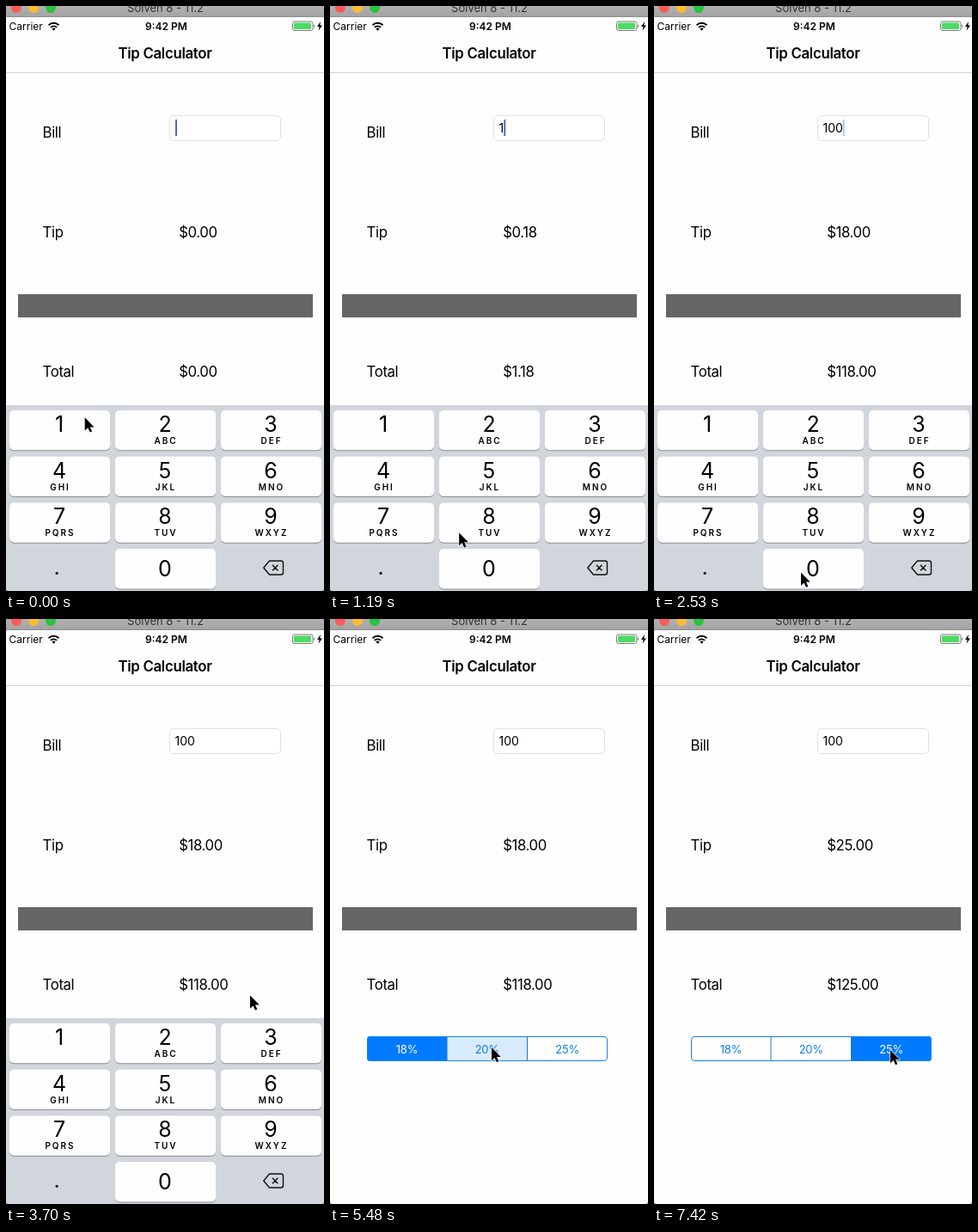
Recreate the animation shown at these times as an HTML page. Size 370 by 680 pixels, loop 8000 ms.

```html
<!DOCTYPE html>
<html lang="en">
<head>
<meta charset="utf-8">
<title>Tip Calculator</title>
<style>
  html, body { margin: 0; width: 100%; height: 100%; overflow: hidden; background: #fefefe; }
  svg { display: block; font-family: Inter, Roboto, sans-serif; }
  .label { font-size: 16.8px; letter-spacing: -.4px; }
  .title { font-size: 16.8px; font-weight: 600; letter-spacing: -.3px; }
  .status { font-size: 12px; }
  .digit { font-size: 25px; text-anchor: middle; }
  .letters { font-size: 10px; font-weight: 600; letter-spacing: 2px; text-anchor: middle; }
  .option { font-size: 13px; letter-spacing: -.2px; text-anchor: middle; }
</style>
</head>
<body>
<svg id="stage" width="370" height="680" viewBox="0 0 370 680">
  <defs>
    <linearGradient id="chrome" x2="0" y2="1">
      <stop stop-color="#b0b0b0"/><stop offset="1" stop-color="#a4a4a4"/>
    </linearGradient>
    <clipPath id="segmentClip"><rect x="43" y="485" width="280" height="29" rx="4"/></clipPath>
  </defs>
  <rect width="370" height="680" fill="#fefefe"/>

  <rect width="370" height="12" fill="url(#chrome)"/>
  <rect y="12" width="370" height="1" fill="#8f8f8f"/>
  <circle cx="12" cy="2" r="6" fill="#fc5b57"/>
  <circle cx="32" cy="2" r="6" fill="#fdbb2f"/>
  <circle cx="52" cy="2" r="6" fill="#28c33f"/>
  <text x="185.5" y="7" font-size="13" text-anchor="middle" fill="#333">Solven 8 - 11.2</text>

  <text class="status" x="3.6" y="27.5">Carrier</text>
  <g fill="none" stroke="#000" stroke-width="2">
    <path d="M49.6 22.2a8.6 8.6 0 0 1 11.8 0"/>
    <path d="M51.9 24.9a5.2 5.2 0 0 1 7.2 0"/>
  </g>
  <path d="M53.4 26.5a3 3 0 0 1 4.2 0l-2.1 2.2z"/>
  <text class="status" x="186.5" y="27.5" text-anchor="middle" font-weight="600">9:42 PM</text>
  <rect x="333.5" y="18" width="23.5" height="10.5" rx="2.5" fill="none" stroke="#777"/>
  <rect x="335" y="19.5" width="20" height="7.5" rx="1" fill="#4cd964"/>
  <path d="M358 21.3q2.2 2 0 4z" fill="#777"/>
  <path d="M366 18l-4 6h2.6l-1 4.6 4.4-6.2h-2.7z"/>

  <text class="title" x="130.5" y="61">Tip Calculator</text>
  <rect y="77" width="370" height="1" fill="#d2d2d2"/>

  <text class="label" x="42.6" y="152.5">Bill</text>
  <text class="label" x="42.6" y="268.5">Tip</text>
  <text class="label" x="42.6" y="430.5">Total</text>
  <text class="label" id="tip" x="201.2" y="268.5"></text>
  <text class="label" id="total" x="201.2" y="430.5"></text>

  <rect x="190.5" y="127.5" width="129" height="29" rx="4.5" fill="#fff" stroke="#e0e0e0"/>
  <text id="bill" x="196.6" y="147" font-size="14"></text>
  <rect id="caret" y="132" width="2" height="19" fill="#4468e0"/>

  <rect x="14" y="335" width="343" height="27" fill="#666"/>

  <g id="segments" clip-path="url(#segmentClip)"></g>
  <rect x="43.5" y="485.5" width="279" height="28" rx="3.5" fill="none" stroke="#1a7fe8"/>

  <g id="keyboard"><rect y="464" width="370" height="220" fill="#d1d5dc"/></g>
  <path d="M0 678v2h2zM370 678v2h-2z" fill="#888"/>

  <path id="pointer" d="M0 0V15.2L3.5 11.9 6 17.3 8.4 16.2 6 11.1H10.8Z"
        stroke="#fff" stroke-width="1.2" paint-order="stroke" stroke-linejoin="round"/>
</svg>
<script>
const LOOP = 8000, TICK = 148;
const $ = id => document.getElementById(id);

function add(parent, tag, attrs, text = '') {
  const el = document.createElementNS('http://www.w3.org/2000/svg', tag);
  for (const name in attrs) el.setAttribute(name, attrs[name]);
  el.textContent = text;
  return parent.appendChild(el);
}

// Keypad
const keys = {};
['1', '2 ABC', '3 DEF', '4 GHI', '5 JKL', '6 MNO', '7 PQRS', '8 TUV', '9 WXYZ', '', '0'].forEach((key, i) => {
  if (!key) return;
  const [digit, letters] = key.split(' ');
  const x = 4 + i % 3 * 123, y = 470 + Math.floor(i / 3) * 53.7, mid = x + 58;
  const box = { x, width: 117, height: 46.3, rx: 5 };
  add($('keyboard'), 'rect', { ...box, y: y + 1, fill: '#898c92' });
  keys[digit] = add($('keyboard'), 'rect', { ...box, y });
  add($('keyboard'), 'text', { class: 'digit', x: mid, y: y + (digit === '0' ? 31.5 : 25) }, digit);
  if (letters) add($('keyboard'), 'text', { class: 'letters', x: mid + 1, y: y + 39 }, letters);
});
add($('keyboard'), 'text', { class: 'digit', x: 59, y: 660.5 }, '.');
add($('keyboard'), 'path', {
  d: 'M306.5 645h13.5a2.5 2.5 0 0 1 2.5 2.5v11a2.5 2.5 0 0 1-2.5 2.5h-13.5l-6.7-8zM310 649.8l6.4 6.4m0-6.4l-6.4 6.4',
  fill: 'none', stroke: '#111', 'stroke-width': 1.4, 'stroke-linejoin': 'round'
});

// Rate picker
const rates = [18, 20, 25];
const segments = rates.map((rate, i) => {
  const x = 43 + i * 93.3;
  return {
    fill: add($('segments'), 'rect', { x, y: 485, width: 93.4, height: 29 }),
    text: add($('segments'), 'text', { class: 'option', x: x + 46.5, y: 504.5 }, rate + '%')
  };
});
for (const x of [135.5, 229]) add($('segments'), 'rect', { x, y: 485, width: 1, height: 29, fill: '#2873c4' });

// Each track holds its value until the next time
const bills = [[0, ''], [300, '1'], [1640, '10'], [2080, '100']];
const pressed = [[0, ''], [150, '1'], [300, ''], [1490, '0'], [1640, ''], [1940, '0'], [2080, '']];
const selected = [[0, 0], [5630, 1], [7270, 2]];
const touched = [[0, -1], [5480, 1], [5630, -1], [6970, 2], [7270, 1], [7420, -1]];
const caretAlpha = [[0, 1], [750, .5], [900, 0], [1190, 1], [1490, 1], [2530, .4], [2680, 0],
  [2970, .6], [3118, 1], [3414, .5], [3562, 0]];
const keyboardDrop = [[0, 0], [3850, 164], [4000, 211], [4150, 215.5], [4290, 220]];
const caretX = { '': 197, 1: 202.3, 10: 211, 100: 219.7 };

const easeOut = k => 1 - (1 - k) ** 2.2;
const easeInOut = k => k * k * (3 - 2 * k);

function move(start, steps, from, to, ease) {
  return Array.from({ length: steps }, (_, i) => {
    const k = ease((i + 1) / steps);
    return [start + i * TICK, from.map((v, axis) => v + (to[axis] - v) * k)];
  });
}

const one = [90.7, 479.8], zero = [171, 658.5], away = [293, 419.8], middle = [188, 498], last = [275, 501];
const pointer = [
  [0, [91.7, 478.3]], [150, one],
  ...move(600, 6, one, zero, easeInOut),
  ...move(2970, 6, zero, away, easeInOut),
  ...move(4590, 4, away, middle, easeOut),
  [6380, [237, 510]],
  ...move(6530, 3, [237, 510], last, easeOut)
];

const at = (track, t) => track.findLast(([start]) => start <= t)[1];
const money = value => '$' + value.toFixed(2);

function draw(t) {
  const bill = at(bills, t), choice = at(selected, t), touch = at(touched, t), key = at(pressed, t);
  const tip = bill * rates[choice] / 100;
  $('bill').textContent = bill;
  $('tip').textContent = money(tip);
  $('total').textContent = money(+bill + tip);
  $('caret').setAttribute('x', caretX[bill]);
  $('caret').setAttribute('opacity', at(caretAlpha, t));
  for (const digit in keys) keys[digit].setAttribute('fill', digit === key ? '#b9c0cb' : '#fefefe');
  segments.forEach(({ fill, text }, i) => {
    fill.setAttribute('fill', i === choice ? '#007aff' : i === touch ? '#d9ebff' : '#fefefe');
    text.setAttribute('fill', i === choice ? '#fff' : '#0a7cf0');
  });
  $('keyboard').setAttribute('transform', `translate(0 ${at(keyboardDrop, t)})`);
  $('pointer').setAttribute('transform', `translate(${at(pointer, t)})`);
}

const began = performance.now();
function frame() {
  draw((performance.now() - began) % LOOP);
  requestAnimationFrame(frame);
}
frame();
</script>
</body>
</html>
```
